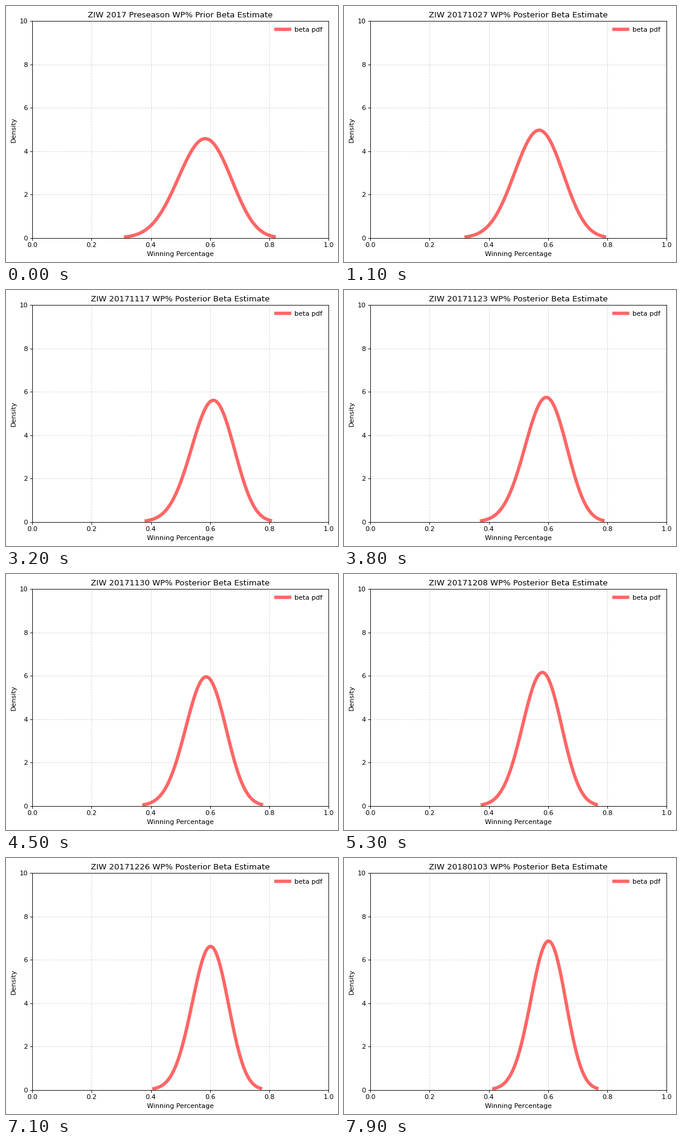
Animation of 556x428 px, one loop 8 s. Source, as a matplotlib script:

```python
from math import lgamma

import matplotlib.pyplot as plt
import numpy as np
from matplotlib.animation import FuncAnimation

W, H, DPI = 556, 428, 80
DAYS = 80
TEAM = "ZIW"
START = np.datetime64("2017-10-16")

# Beta prior, then the days (counted from START) of each win and loss
PRIOR_A, PRIOR_B = 18.8, 13.7
WINS = np.array([4, 6, 11, 14, 16, 19, 20, 28, 30, 32, 37, 41,
                 44, 48, 51, 55, 59, 63, 65, 68, 70, 72, 76, 77])
LOSSES = np.array([2, 8, 9, 23, 26, 34, 35, 39, 43, 46, 49, 57, 61, 73, 79])

GRID = np.linspace(0, 1, 8001)[1:-1]


def beta_pdf(x, a, b):
    log_norm = lgamma(a + b) - lgamma(a) - lgamma(b)
    return np.exp(log_norm + (a - 1) * np.log(x) + (b - 1) * np.log1p(-x))


def beta_ppf(q, a, b):
    cdf = np.cumsum(beta_pdf(GRID, a, b))
    return np.interp(q, cdf / cdf[-1], GRID)


def curve(day):
    a = PRIOR_A + np.sum(WINS <= day)
    b = PRIOR_B + np.sum(LOSSES <= day)
    lo, hi = beta_ppf([0.001, 0.999], a, b)
    x = np.linspace(lo, hi, 100)
    return x, beta_pdf(x, a, b)


def heading(day):
    if day == 0:
        return f"{TEAM} 2017 Preseason WP% Prior Beta Estimate"
    date = str(START + day).replace("-", "")
    return f"{TEAM} {date} WP% Posterior Beta Estimate"


plt.rcParams["font.family"] = "DejaVu Sans"
fig = plt.figure(figsize=(W / DPI, H / DPI), dpi=DPI, facecolor="white")
ax = fig.add_axes([44.2 / W, 40.4 / H, 496 / W, 362.4 / H])
ax.set(xlim=(0, 1), ylim=(0, 10),
       xlabel="Winning Percentage", ylabel="Density")
ax.grid(linestyle="--", alpha=0.5)

line, = ax.plot(*curve(0), "r-", lw=5, alpha=0.6, label="beta pdf")
title = ax.set_title(heading(0), fontsize=12)
ax.legend(loc="upper right", frameon=False)


def update(day):
    line.set_data(*curve(day))
    title.set_text(heading(day))
    return line, title


anim = FuncAnimation(fig, update, frames=DAYS, interval=100,
                     repeat=True, repeat_delay=0, blit=False)
plt.show()
```
